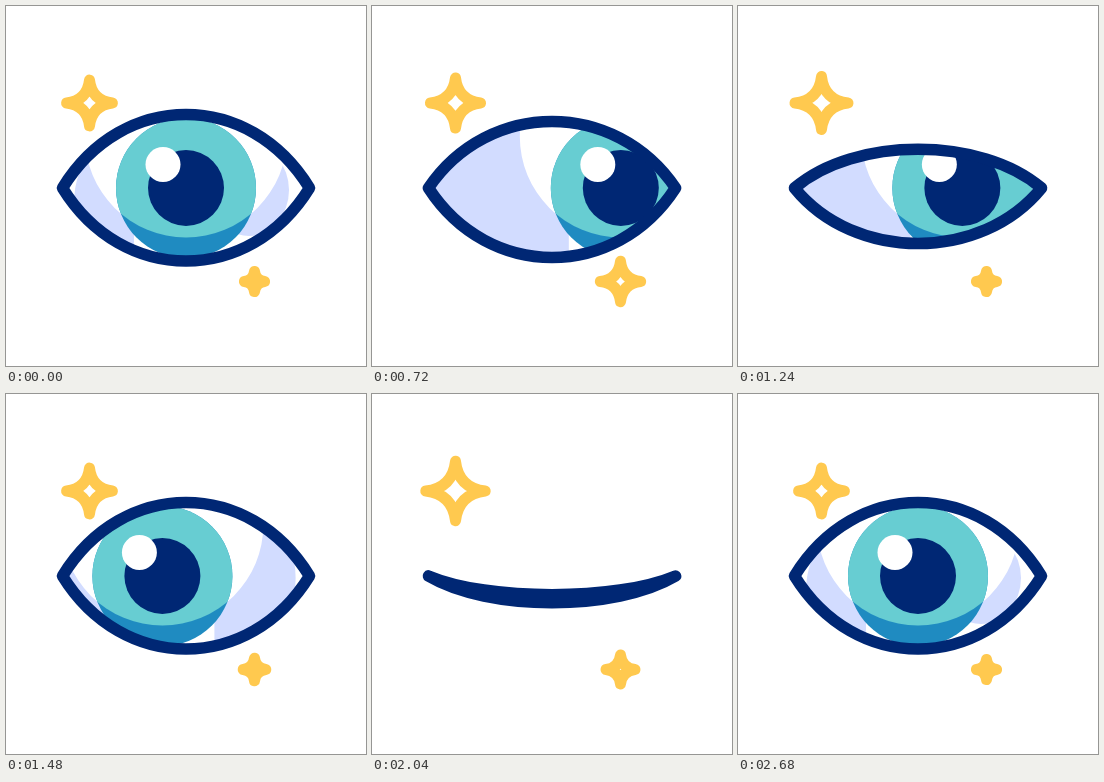
Animation, 360 px wide and 360 px high, one loop 3 s. Source, as an HTML page with a canvas:

```html
<!DOCTYPE html>
<html lang="en">
<head>
<meta charset="utf-8">
<title>Blinking eye</title>
<style>
  html, body { margin: 0; width: 100%; height: 100%; overflow: hidden; background: #fff; }
  canvas { display: block; width: 360px; height: 360px; }
</style>
</head>
<body>
<canvas width="360" height="360"></canvas>
<script>
const ctx = document.querySelector('canvas').getContext('2d');
const LOOP = 3000, STEP = 40;
const NAVY = '#002774', TEAL = '#67cdd2', BLUE = '#1f8bc1', SHADE = '#d2dcff', GOLD = '#ffc94f';
const LIGHT = { y: -51.5, r: 101 };  // lit area of the eyeball, relative to the pupil

const mix = (a, b, p) => a + (b - a) * p;

// Sine-eased progress from 0 to 1 between two times
function ease(t, start, end) {
  const p = Math.min(1, Math.max(0, (t - start) / (end - start)));
  return (1 - Math.cos(Math.PI * p)) / 2;
}

const pulse = (t, peak) => ease(t, peak - 400, peak) - ease(t, peak, peak + 400);
const blink = (t, start) => ease(t, start, start + 242) - ease(t, start + 242, start + 782);
const gaze = t => 69 * (ease(t, 200, 738) - 2 * ease(t, 1040, 1760) + ease(t, 1960, 2680));

function disc(x, y, r, color) {
  ctx.beginPath();
  ctx.arc(x, y, r, 0, 7);
  ctx.fillStyle = color;
  ctx.fill();
}

function star(x, y, size) {
  const h = size - 5.5, k = h * 0.1;
  ctx.save();
  ctx.translate(x, y);
  ctx.beginPath();
  ctx.moveTo(0, -h);
  ctx.quadraticCurveTo(k, -k, h, 0);
  ctx.quadraticCurveTo(k, k, 0, h);
  ctx.quadraticCurveTo(-k, k, -h, 0);
  ctx.quadraticCurveTo(-k, -k, 0, -h);
  ctx.closePath();
  ctx.lineWidth = 11;
  ctx.strokeStyle = GOLD;
  ctx.stroke();
  ctx.restore();
}

function lids(closed) {
  const left = 56.5, right = 303.5, y = 182, reach = 60;
  const top = y + mix(-73.5, 24, closed) / 0.75;
  const bottom = y + mix(73, 24, closed) / 0.75;
  const path = new Path2D();
  path.moveTo(left, y);
  path.bezierCurveTo(left + reach, top, right - reach, top, right, y);
  path.bezierCurveTo(right - reach, bottom, left + reach, bottom, left, y);
  path.closePath();
  return path;
}

// Crescent of shade on one side of the eyeball (side is -1 or 1)
function shade(side, look, cx, cy, rx, ry) {
  const grow = 1 + 0.032 * Math.max(0, -side * look);
  ctx.save();
  ctx.beginPath();
  ctx.rect(52 * side, -200, 300 * side, 400);
  ctx.clip();
  ctx.beginPath();
  ctx.rect(-400, -400, 800, 800);
  ctx.arc(0, LIGHT.y, LIGHT.r, 0, 2 * Math.PI);
  ctx.clip('evenodd');
  ctx.beginPath();
  ctx.ellipse(cx, cy, rx * grow, ry * grow, 0, 0, 7);
  ctx.fillStyle = SHADE;
  ctx.fill();
  ctx.restore();
}

function eyeball(look) {
  ctx.translate(180 + look, 182);
  shade(-1, look, -50, 15, 62, 75);
  shade(1, look, 63, 2, 40, 46);
  disc(0, 0, 70, BLUE);
  ctx.save();
  ctx.beginPath();
  ctx.arc(0, 0, 70, 0, 7);
  ctx.clip();
  disc(0, LIGHT.y, LIGHT.r, TEAL);
  ctx.restore();
  disc(0, 0, 38, NAVY);
  disc(-23, -23.5, 17.5, '#fff');
}

function draw(t) {
  ctx.fillStyle = '#fff';
  ctx.fillRect(0, 0, 360, 360);
  ctx.lineJoin = ctx.lineCap = 'round';

  star(83.5, 97, 28.4 + 10.4 * (pulse(t, 1000) + pulse(t, 2200)));
  star(248.5, 275.5, 15.6 + 12.7 * (pulse(t, 600) + pulse(t, 1800)));

  const outline = lids(blink(t, 678) + blink(t, 1718));
  ctx.save();
  ctx.clip(outline);
  eyeball(gaze(t));
  ctx.restore();
  ctx.lineWidth = 11.6;
  ctx.strokeStyle = NAVY;
  ctx.stroke(outline);
}

function tick() {
  const t = performance.now() % LOOP;
  draw(Math.floor(t / STEP) * STEP);
  requestAnimationFrame(tick);
}
tick();
</script>
</body>
</html>
```
